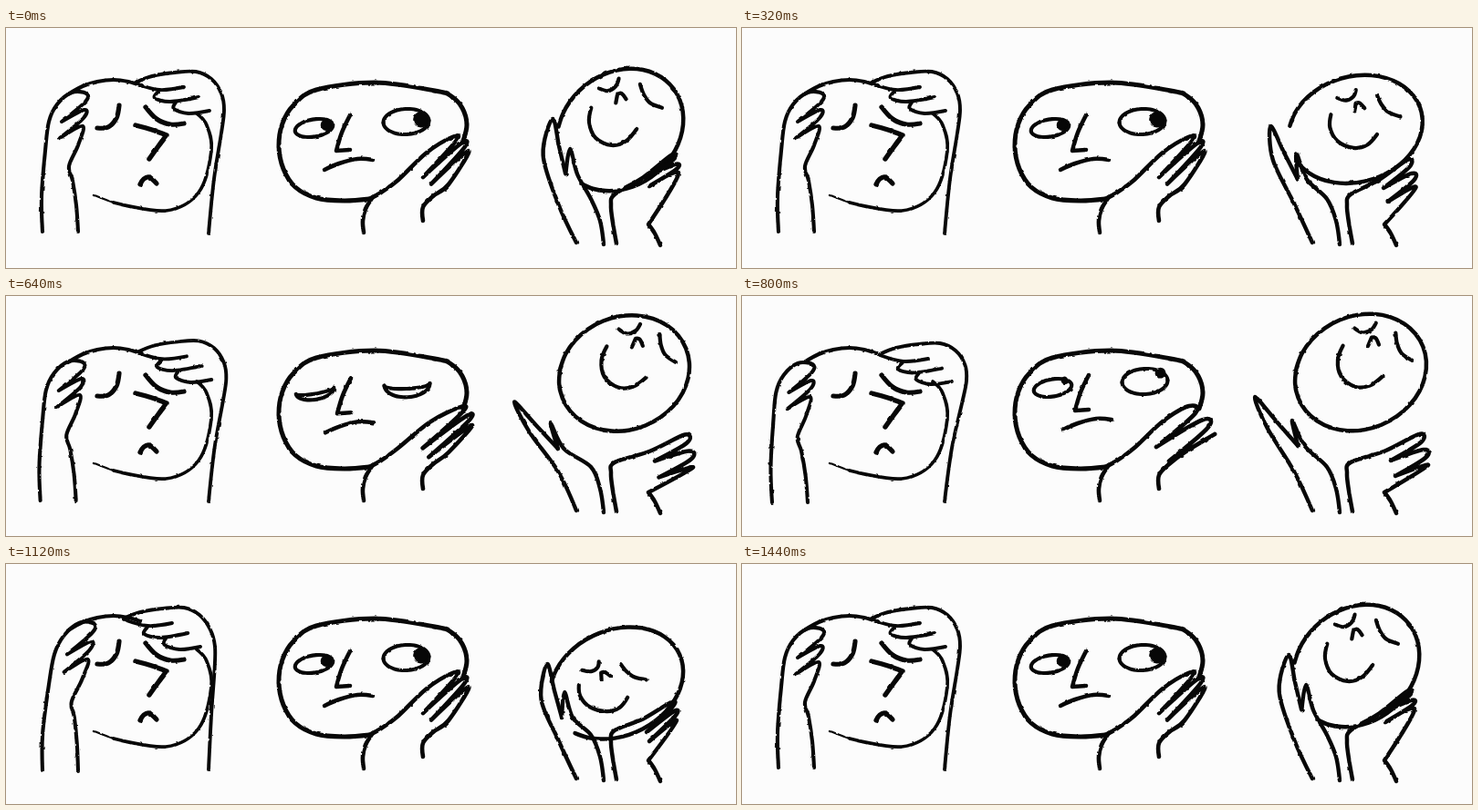
Write an HTML page that moves like this. It is 800 by 264 pixels and loops after 2.48 s.

```html
<!DOCTYPE html>
<html lang="en">
<head>
<meta charset="utf-8">
<title>Three moods</title>
<style>
html, body { margin: 0; width: 100%; height: 100%; overflow: hidden; background: #fcfcfc; }
svg { display: block; width: 100vw; height: 100vh; }
path { fill: none; stroke: #070707; stroke-linecap: round; stroke-linejoin: round; }
path.solid { fill: #070707; }
</style>
</head>
<body>
<svg viewBox="0 0 800 264">
  <filter id="rough" filterUnits="userSpaceOnUse" x="0" y="0" width="800" height="264" color-interpolation-filters="sRGB">
    <feTurbulence type="fractalNoise" baseFrequency=".15" numOctaves="2" seed="4"/>
    <feDisplacementMap in="SourceGraphic" scale="2.4" xChannelSelector="R" yChannelSelector="G"/>
  </filter>
  <g id="ink" filter="url(#rough)"></g>
</svg>
<script>
const LOOP = 2480, STEP = 80, REST = 1440;
const ink = document.getElementById("ink");

// ---- motion: where each figure's moving parts are at its key times ----
const worriedKeys = [
  { t: 560, foot: [0, 0], hand: [0, 0], farHand: [0, 0] },
  { t: 800, foot: [-7, 3], hand: [-11, 3], farHand: [9, 4] },
  { t: 960, foot: [0, 2], hand: [7, -5], farHand: [-9, 2] },
  { t: 1120, foot: [0, 3], hand: [9, -7], farHand: [-13, 0] },
  { t: 1440, foot: [0, 0], hand: [0, 0], farHand: [0, 0] }
];

const awake = { face: [0, 0], open: 1, gaze: [.66, -.1], pupil: .55, tip: [489, 120], step: [9, 7.5], reach: [-32, 44] };
const asleep = { face: [0, -4], open: 0, gaze: [.7, 0], pupil: 0, tip: [501, 123], step: [3, 7], reach: [-43, 45] };
const wearyKeys = [
  { t: 320, ...awake },
  { t: 400, ...asleep },
  { t: 560, ...asleep },
  { t: 800, face: [3, -9], open: 1, gaze: [.7, -.6], pupil: .35, tip: [490, 121], step: [14, 15.5], reach: [-36, 45] },
  { t: 960, ...awake, face: [2, -5], gaze: [.75, -.1], pupil: .42 },
  { t: 1120, ...awake }
];

// head: centre, radii, tilt; face: centre, turn, squash
const settled = { head: [673, 112, 74, 62, -40], gap: 65, face: [683, 70, 22, 1], finger: [599, 100], thumb: [618, 133], tip: [729, 140], step: [4, 10], reach: [-28, 24] };
const happyKeys = [
  { t: 0, ...settled },
  { t: 240, head: [670, 124, 76, 56, -15], gap: 65, face: [676, 97, 13, .78], finger: [593, 101], thumb: [616, 136], tip: [721, 141], step: [5, 13], reach: [-22, 32] },
  { t: 480, head: [677, 86, 72, 62, -20], gap: 0, face: [703, 49, 36, 1], finger: [552, 122], thumb: [591, 143], tip: [746, 153], step: [4, 19], reach: [-35, 29] },
  { t: 800, head: [678, 84, 74, 62, -25], gap: 0, face: [703, 46, 34, 1], finger: [562, 111], thumb: [603, 137], tip: [742, 152], step: [5, 17], reach: [-31, 29] },
  { t: 960, head: [673, 133, 72, 59, -20], gap: 65, face: [671, 106, 12, .85], finger: [600, 110], thumb: [620, 143], tip: [726, 150], step: [4, 13], reach: [-24, 36] },
  { t: 1120, head: [669, 131, 76, 58, -25], gap: 65, face: [664, 117, 12, .73], finger: [593, 110], thumb: [612, 141], tip: [729, 152], step: [3, 10], reach: [-27, 33] },
  { t: 1440, ...settled }
];

// ---- helpers ----
const mix = (a, b, k) => Array.isArray(a) ? a.map((v, i) => mix(v, b[i], k)) : a + (b - a) * k;
const add = (p, q) => [p[0] + q[0], p[1] + q[1]];

function poseAt(keys, t) {
  const next = keys.findIndex(key => key.t > t);
  if (next < 0) return keys[keys.length - 1];
  if (next === 0) return keys[0];
  const a = keys[next - 1], b = keys[next], k = (t - a.t) / (b.t - a.t);
  return Object.fromEntries(Object.keys(a).map(name => [name, mix(a[name], b[name], k)]));
}

// A point is [x, y] or [x, y, true] for a sharp corner, written "x,y!" in text.
const points = text => text.split(" ").map(p => [...p.split(",").map(parseFloat), p.endsWith("!")]);
const move = (pts, by) => pts.map(([x, y, sharp]) => [x + by[0], y + by[1], sharp]);

function turn([x, y, sharp], [cx, cy], degrees) {
  const a = degrees * Math.PI / 180, c = Math.cos(a), s = Math.sin(a);
  return [cx + x * c - y * s, cy + x * s + y * c, sharp];
}

function arc(center, rx, ry, tilt, from, to, n = 16) {
  return Array.from({ length: n + 1 }, (_, i) => {
    const a = mix(from, to, i / n) * Math.PI / 180;
    return turn([rx * Math.cos(a), ry * Math.sin(a)], center, tilt);
  });
}

// Three blunt fingertips with two valleys between them.
function fingers(tip, step, reach) {
  const pts = [];
  for (let i = 0; i < 3; i++) {
    const p = add(tip, [step[0] * i, step[1] * i]);
    pts.push(p);
    if (i < 2) pts.push(add(p, [step[0] / 2, step[1] / 2]), [...add(p, reach), true]);
  }
  return pts;
}

// Bends a limb: its foot and its hand move by different amounts.
const bend = (pts, foot, hand) => pts.map(([x, y, sharp]) => {
  const k = Math.max(0, Math.min(1, (225 - y) / 160)) ** 1.5;
  return [...add([x, y], mix(foot, hand, k)), sharp];
});

// Smooth curve through the points, straight into corners.
function curve(pts) {
  const handle = (i, side) => {
    const p = pts[i], a = pts[i - 1], b = pts[i + 1];
    if (p[2] || !a || !b) return p.slice(0, 2);
    return [p[0] + side * (b[0] - a[0]) / 6, p[1] + side * (b[1] - a[1]) / 6];
  };
  const out = (...ps) => ps.flatMap(p => p.slice(0, 2)).map(v => v.toFixed(2)).join(" ");
  return "M" + out(pts[0]) + pts.slice(1).map((p, i) => "C" + out(handle(i, 1), handle(i + 1, -1), p)).join("");
}

const line = (width, pts, kind = "") =>
  `<path class="${kind}" stroke-width="${width}" d="${curve(pts)}"/>`;

// ---- the three figures ----
const worriedStill = [
  [4.1, "68,73 84,64 100,59 118,57 134,59 147,63"],
  [3.7, "209,94 220,107 225,135 211,181 175,201 118,192"],
  [2.4, "118,192 107,188 97,184"],
  [5.2, "124,85 121,99 112,109 100,110"],
  [5.2, "153,87 165,100 180,106 195,105"],
  [5.4, "142,107 160,112 176,118! 167,130 157,144"],
  [5.2, "147,172 151,166 157,164 165,171"]
].map(([w, text]) => line(w, points(text))).join("");

const nearArm = [
  ...points("40,224 39,185 43,135 47,103 56,84 72,71"),
  ...fingers([88, 72], [-2, 18], [-27, 31]),
  ...points("79,129 69,152 73,168 77,195 79,224")
];
const farArm = points("142,60 160,53 185,49 208,48 225,56 236,72 239,90 236,115 228,165 222,225");
const farFingers = ["142,61 168,68 195,65", "167,70 163,77 180,81 211,76", "186,82 184,89 200,94 223,91"].map(points);

function worried({ foot, hand, farHand }) {
  return worriedStill +
    line(4.1, bend(nearArm, foot, hand)) +
    line(3.9, bend(farArm, [0, 1], farHand)) +
    farFingers.map(f => line(3.9, bend(f, [0, 0], farHand))).join("");
}

const wearyStill =
  line(5, points("501,124 505,106 500,88 488,75 470,69 405,60 340,68 315,85 303,105 299,130 304,155 317,175 340,187 370,190 398,188")) +
  line(4.6, points("402,186 394,199 391,212 392,225"));
const wearyNose = points("377,96 368,115 362,135! 377,134");
const wearyMouth = points("349,156 365,149 385,144 402,145");

function eye(center, rx, ry, tilt, { open, gaze, pupil }) {
  const size = ry * pupil;
  const spot = turn([gaze[0] * rx, gaze[1] * ry], center, tilt);
  return line(4.1, arc(center, rx, ry, tilt, 0, 180)) +
    line(4.1, arc(center, rx, ry * (1 - 2 * open), tilt, 0, 180)) +
    (open > .5 ? line(2, arc(spot, size, size, 0, 0, 360), "solid") : "");
}

function weary(pose) {
  const { face, tip, step, reach } = pose;
  const knuckle = add(mix([430, 167], tip, .5), [1, -6]);
  return wearyStill +
    line(4.6, [...points("398,188 411,181 430,167"), knuckle, ...fingers(tip, step, reach),
      ...points("485,172 468,185 457,197 457,212")]) +
    eye(add([337.5, 110], face), 21, 9.5, -10, pose) +
    eye(add([438.5, 103], face), 25, 14, -3, pose) +
    line(4.6, move(wearyNose, face)) +
    line(4.5, move(wearyMouth, face));
}

// Drawn around the point between the eyes.
const happyFace = [
  "-32,9 -22,8 -16,0 -16,-9",
  "8,-12 16,-3 26,3 40,3",
  "-9,17 -11,7! -7,5 0,9",
  "-32,32 -28,48 -15,61 4,62 17,52 23,35"
].map(points);

function happy({ head, gap, face, finger, thumb, tip, step, reach }) {
  const [cx, cy, rx, ry, tilt] = head, [fx, fy, angle, squash] = face;
  const start = 188 - tilt;
  const lean = 600 - finger[0];
  const belly = add(finger, [lean * .65 - 11, 40 - lean * .15]);
  const web = add(thumb, [lean * .3 - 5, 28]);
  const wrist = [667, 183];
  return line(4.5, arc([cx, cy], rx, ry, tilt, start, start + 360 - gap, 24)) +
    happyFace.map(f => line(4.2, f.map(([x, y, sharp]) => turn([x, y * squash, sharp], [fx, fy], angle)))).join("") +
    line(4.4, [[625, 236], [605, 193], belly, finger, mix(finger, web, .5), web]) +
    line(4.4, [web, thumb, add(thumb, [8 + lean * .15, 28]), [641, 188], [651, 212], [655, 238]]) +
    line(4.5, [[669, 237], [665, 214], [663, 195], wrist, add(mix(wrist, tip, .5), [0, 3]),
      ...fingers(tip, step, reach), [704, 216, true], [711, 226], [717, 239]]);
}

function draw(t) {
  ink.innerHTML = worried(poseAt(worriedKeys, t)) + weary(poseAt(wearyKeys, t)) + happy(poseAt(happyKeys, t));
}

const begin = performance.now();
let shown = -1;
function tick() {
  const t = (performance.now() - begin) % LOOP;
  const step = Math.min(REST, Math.floor(t / STEP) * STEP);
  if (step !== shown) draw(shown = step);
  requestAnimationFrame(tick);
}
tick();
</script>
</body>
</html>
```
